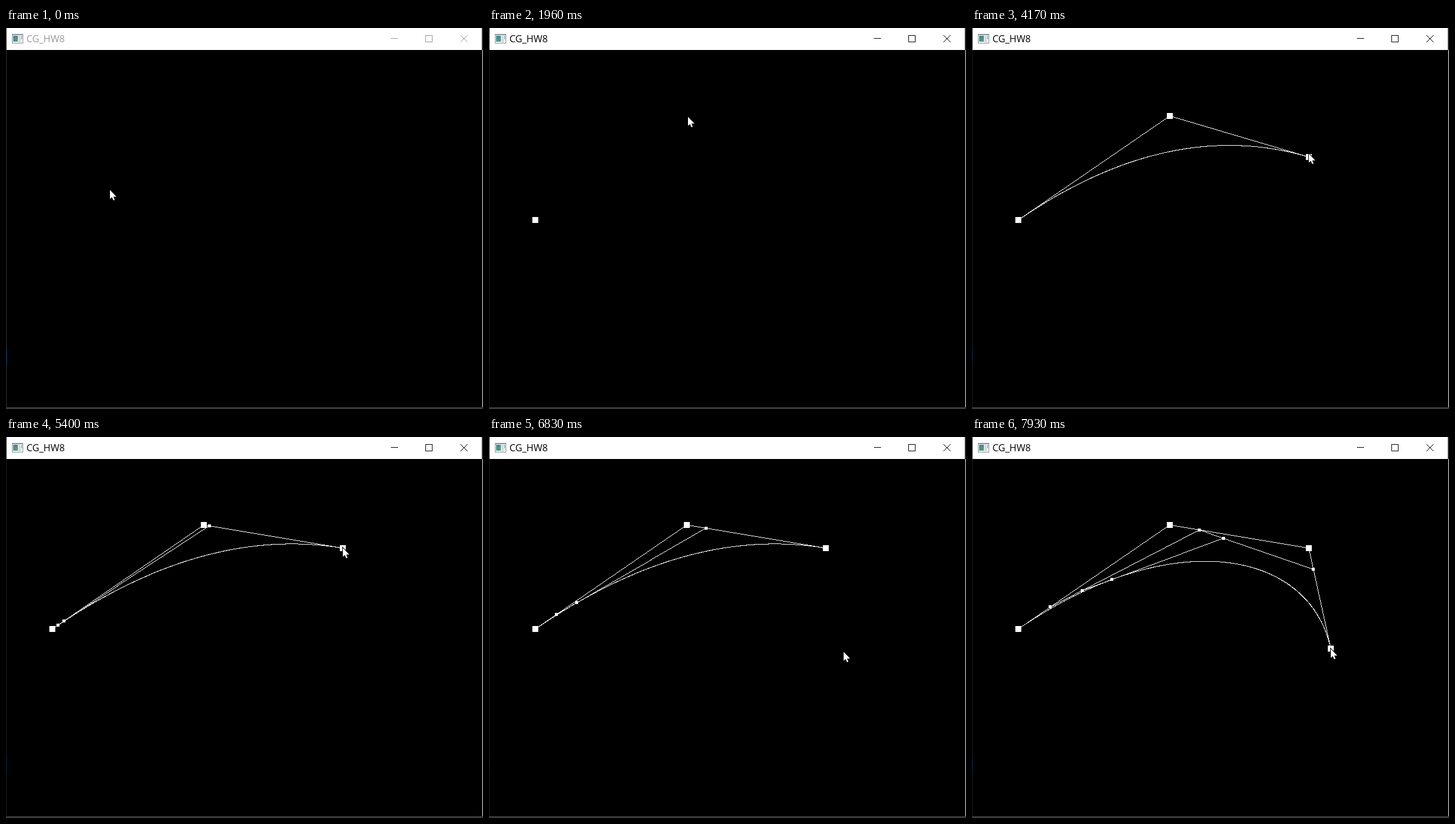
Recreate the animation shown at these times as an HTML page with a canvas. Size 803 by 641 pixels, loop 8000 ms.

```html
<!DOCTYPE html>
<html lang="en">
<head>
<meta charset="utf-8">
<title>Bezier editor</title>
<style>
html, body { margin: 0; width: 100%; height: 100%; overflow: hidden; background: #000; }
canvas { display: block; }
</style>
</head>
<body>
<canvas id="stage" width="803" height="641"></canvas>
<script>
const ctx = document.getElementById('stage').getContext('2d');
const LOOP = 8000, ACTIVATE = 1470, PLAY = 4908, TICK = 120;

const move = (start, duration, x, y) => ({ start, duration, to: [x, y] });
const place = (start, x, y) => move(start, 0, x, y);

const pointer = [
  place(0, 175, 273),
  move(110, 720, 80, 323),
  move(1720, 360, 335, 150),
  move(2580, 360, 567, 273),
  move(4170, 360, 567, 187),
  move(5870, 580, 566, 398),
  move(6600, 240, 597, 362),
  place(6950, 602, 371),
  move(7440, 480, 604, 357)
];
const controls = [
  [place(1470, 78, 323)],
  [place(2330, 333, 148)],
  [place(3180, 567, 272), move(4170, 410, 567, 187)],
  [place(7060, 602, 370), move(7440, 480, 604, 356)]
];

const mix = (a, b, u) => a.map((v, i) => v + (b[i] - v) * u);
const easeOut = u => 1 - (1 - u) ** 3;

// Motion eases out, advancing once per tick.
function at(track, time) {
  let position;
  for (const { start, duration, to } of track) {
    if (time < start) break;
    const elapsed = TICK * (Math.floor((time - start) / TICK) + 1);
    position = mix(position || to, to, easeOut(Math.min(1, elapsed / duration)));
  }
  return position;
}

function rect(color, x, y, w, h) {
  ctx.fillStyle = color;
  ctx.fillRect(x, y, w, h);
}

function square([x, y], size) {
  const half = size >> 1;
  ctx.fillRect(Math.floor(x) - half, Math.floor(y) - half, size, size);
}

function line(a, b) {
  const n = Math.ceil(Math.max(Math.abs(b[0] - a[0]), Math.abs(b[1] - a[1])));
  for (let i = 0; i < n; i++) square(mix(a, b, (i + 0.5) / n), 1);
}

const reduce = (points, u) => points.slice(1).map((p, i) => mix(points[i], p, u));

function bezier(points, u) {
  while (points.length > 1) points = reduce(points, u);
  return points[0];
}

function drawCurve(points, u) {
  ctx.fillStyle = '#fff';
  if (points.length > 1)
    for (let i = 0; i <= 1000; i++) square(bezier(points, i / 1000), 1);
  points.forEach(p => square(p, 10));
  for (let level = points; level.length; level = reduce(level, u)) {
    level.slice(1).forEach((p, i) => line(level[i], p));
    if (level !== points) level.forEach(p => square(p, 5));
    if (!u) break;
  }
}

function drawPointer([x, y]) {
  ctx.save();
  ctx.translate(Math.round(x), Math.round(y));
  const arrow = new Path2D('M0-.5V14.5L3.3 11.5 5.8 17 8 16 5.7 10.7H10.8Z');
  ctx.strokeStyle = '#000';
  ctx.lineWidth = 2;
  ctx.stroke(arrow);
  ctx.fillStyle = '#fff';
  ctx.fill(arrow);
  ctx.restore();
}

function drawWindow(active) {
  const ink = active ? '#000' : '#999';
  rect('#000', 0, 0, 803, 641);
  rect(active ? '#1c1c1c' : '#333', 0, 0, 1, 641);
  rect(active ? '#0a2f50' : '#0d4f85', 0, 537, 1, 27);
  rect('#fff', 1, 0, 800, 37);
  rect('#333', 801, 0, 2, 641);
  rect('#ccc', 802, 37, 1, 601);
  rect('#3a3a3a', 0, 638, 803, 3);

  rect('#8a939b', 10, 10, 19, 16);
  rect('#f4f6f7', 11, 12, 17, 13);
  const teal = ctx.createLinearGradient(12, 13, 20, 24);
  teal.addColorStop(0, '#4c7f96');
  teal.addColorStop(1, '#4fa77c');
  rect(teal, 12, 13, 8, 10);
  rect('#d5d9dc', 21, 13, 4, 11);
  rect('#7b858c', 26, 13, 1, 6);

  ctx.fillStyle = ink;
  ctx.font = '16px "Open Sans", sans-serif';
  ctx.fillText('CG_HW8', 34.5, 24);

  rect(ink, 648, 17, 12, 1);
  ctx.strokeStyle = ink;
  ctx.lineWidth = 1;
  ctx.strokeRect(706.5, 12.5, 11, 11);
  ctx.stroke(new Path2D('M765 12l12 12m0-12l-12 12'));
}

function frame() {
  const time = performance.now() % LOOP;
  const tick = Math.floor((time - PLAY) / TICK);
  const u = tick < 0 ? 0 : 0.0055 + 0.00825 * tick;
  drawWindow(time >= ACTIVATE);
  drawCurve(controls.map(track => at(track, time)).filter(Boolean), u);
  drawPointer(at(pointer, time));
  requestAnimationFrame(frame);
}
frame();
</script>
</body>
</html>
```
